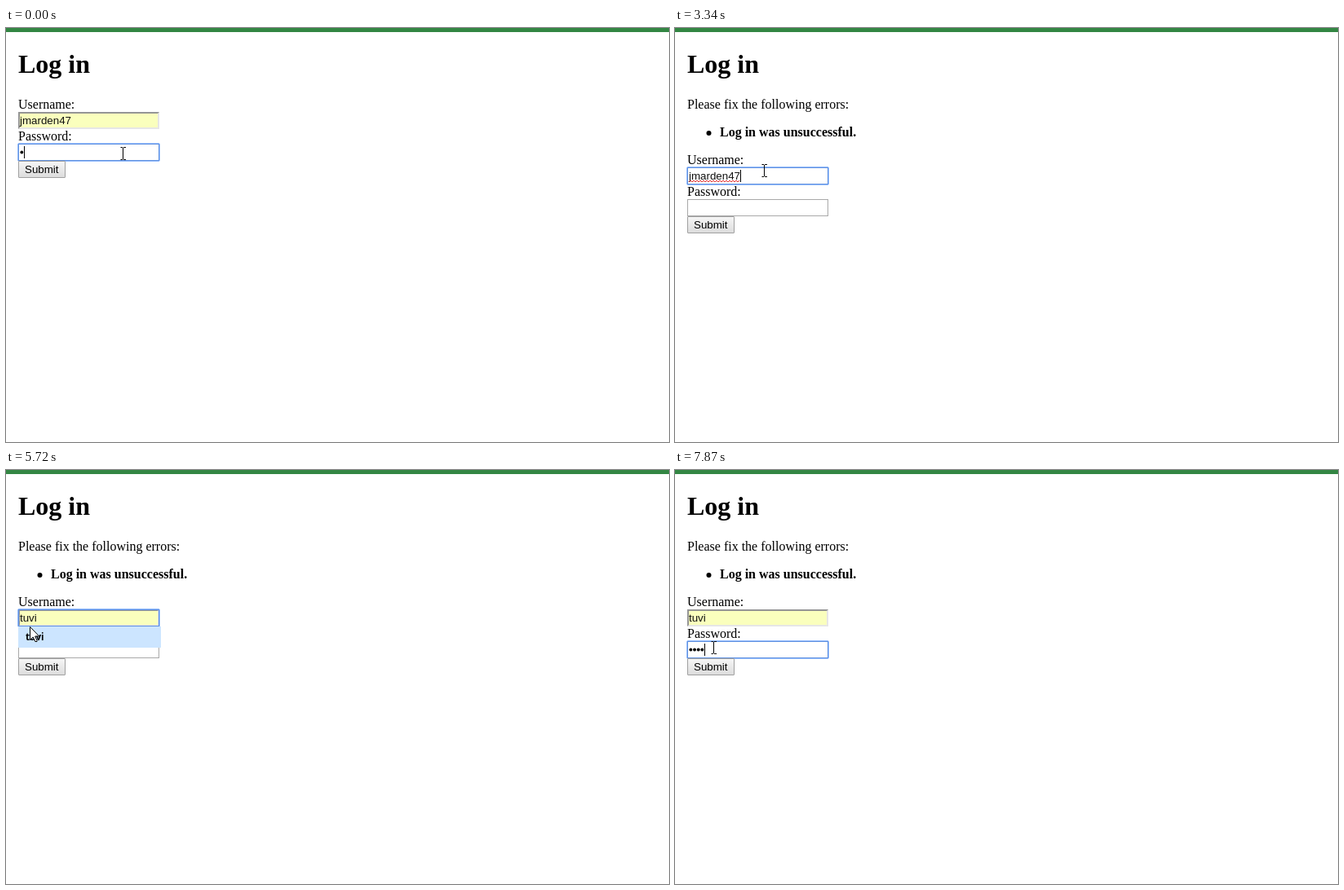
An HTML page for the animation above (8000 ms loop, 813x508 px).

```html
<!DOCTYPE html>
<html lang="en">
<head>
<meta charset="utf-8">
<title>Log in</title>
<style>
  html, body { margin: 0; width: 100%; height: 100%; overflow: hidden; background: #fff; }
  svg { display: block; }
  text { white-space: pre; }
  .serif { font: 16px "Liberation Serif", Times, serif; }
  .bold { font-weight: bold; }
  .title { font-size: 32px; }
  .sans { font: 13.333px "Liberation Sans", Arial, sans-serif; }
  .option { font: bold 11.5px "Open Sans", sans-serif; }
</style>
</head>
<body>
<svg id="stage" width="813" height="508" viewBox="0 0 813 508">
  <defs>
    <linearGradient id="up" x2="0" y2="1"><stop stop-color="#f6f6f6"/><stop offset="1" stop-color="#dcdcdc"/></linearGradient>
    <linearGradient id="down" x2="0" y2="1"><stop stop-color="#d8d8d8"/><stop offset="1" stop-color="#f0f0f0"/></linearGradient>
  </defs>
  <rect width="813" height="5" fill="#338643"/>
  <text class="serif bold title" x="15" y="55">Log in</text>
  <g id="view"></g>
</svg>
<script>
const LOOP = 8000;
const FIRST_USER = "jmarden47";
const NEXT_USER = "tuvi";
const TEXT_X = 17, DOT_STEP = 4.67;

const arrow = (x, y) => ({ kind: "arrow", x, y });
const beam = (x, y) => ({ kind: "beam", x, y });

// Each step changes only the listed parts of the state.
const steps = [
  [0, { error: false, user: FIRST_USER, ink: "#111", filled: true, focus: "pass", dots: 1, caret: true,
        button: "idle", menu: "", selectFrom: null, misspelt: false, pointer: beam(143, 154) }],
  [250, { dots: 2 }],
  [400, { dots: 3 }],
  [520, { dots: 4 }],
  [790, { pointer: arrow(44, 174) }],
  [950, { pointer: arrow(10, 188), caret: false }],
  [1090, { pointer: arrow(20, 180), button: "hover" }],
  [1220, { pointer: arrow(31, 169) }],
  [1360, { focus: "", button: "pressed" }],
  [1510, { button: "hover" }],
  [1910, { error: true, filled: false, dots: 0, button: "idle" }],
  [2570, { pointer: arrow(91, 168) }],
  [2710, { pointer: beam(109, 175) }],
  [3340, { focus: "user", caret: true, misspelt: true }],
  [3640, { pointer: beam(50, 178), selectFrom: 50, caret: false }],
  [3770, { pointer: beam(8, 181), selectFrom: TEXT_X }],
  [3920, { pointer: arrow(3, 173) }],
  [4760, { user: NEXT_USER.slice(0, 1), ink: "#8c1018", selectFrom: null, misspelt: false, caret: true, menu: "open" }],
  [4890, { user: NEXT_USER.slice(0, 2), ink: "#111" }],
  [5020, { user: NEXT_USER.slice(0, 3) }],
  [5160, { user: NEXT_USER }],
  [5570, { pointer: beam(22, 181) }],
  [5720, { pointer: arrow(29, 192), caret: false, menu: "active", filled: true }],
  [5840, { pointer: arrow(34, 193) }],
  [5960, { pointer: arrow(36, 194) }],
  [6090, { pointer: arrow(36, 196) }],
  [6210, { pointer: arrow(37, 198) }],
  [6350, { menu: "", caret: true }],
  [6470, { pointer: arrow(40, 202) }],
  [6620, { pointer: beam(47, 218) }],
  [6750, { focus: "pass" }],
  [7330, { caret: false }],
  [7480, { dots: 1, caret: true }],
  [7600, { dots: 2 }],
  [7750, { dots: 3 }],
  [7870, { dots: 4 }],
];

const pen = document.createElement("canvas").getContext("2d");
pen.font = '13.333px "Liberation Sans", Arial, sans-serif';
const widthOf = s => pen.measureText(s).width;

const rect = (x, y, w, h, fill, extra = "") =>
  `<rect x="${x}" y="${y}" width="${w}" height="${h}" fill="${fill}" ${extra}/>`;
const frame = (x, y, w, h, stroke, fill = "none", extra = "") =>
  rect(x + .5, y + .5, w - 1, h - 1, fill, `stroke="${stroke}" ${extra}`);
const label = (cls, x, y, s, extra = "") =>
  `<text class="${cls}" x="${x}" y="${y}" ${extra}>${s}</text>`;

function field(y, filled, focused) {
  let out;
  if (filled) {
    out = rect(15, y, 173, 21, "#e6e6e6") +
      `<path d="M15 ${y}h173l-2 2H17v17l-2 2z" fill="#959595"/>` +
      rect(17, y + 2, 169, 17, "#faffbd");
  } else {
    out = frame(15, y, 173, 21, "#a9a9a9", "#fff");
  }
  if (focused) {
    out += frame(14, y - 1, 175, 23, "#4d90fe", "none", 'rx="1.5" stroke-opacity=".6"') +
      frame(15, y, 173, 21, "#6292df");
  }
  return out;
}

function userText(s, y) {
  const end = TEXT_X + widthOf(s);
  let out = label("sans", TEXT_X, y + 15, s, `fill="${s.length ? "INK" : ""}"`);
  if (s === FIRST_USER) out = label("sans", TEXT_X, y + 15, s, 'fill="#111"');
  return { out, end };
}

function squiggle(from, to, y) {
  let d = `M${from} ${y}`;
  for (let x = from + 2, i = 1; x <= to; x += 2, i++) d += `L${x} ${y + (i % 2 ? -2 : 0)}`;
  return `<path d="${d}" fill="none" stroke="#e02020" stroke-width=".9"/>`;
}

function userField(s, y) {
  const end = TEXT_X + widthOf(s.user);
  let out = field(y, s.filled, s.focus === "user") +
    label("sans", TEXT_X, y + 15, s.user, `fill="${s.ink}"`);
  if (s.misspelt) out += squiggle(TEXT_X, end, y + 18);
  if (s.selectFrom !== null) {
    const box = [s.selectFrom, y + 3, end - s.selectFrom, 15];
    out += `<clipPath id="chosen">${rect(...box, "#000")}</clipPath>` + rect(...box, "#3399ff") +
      label("sans", TEXT_X, y + 15, s.user, 'fill="#fff" clip-path="url(#chosen)"');
  }
  return out;
}

function passField(s, y) {
  let out = field(y, false, s.focus === "pass");
  for (let i = 0; i < s.dots; i++)
    out += `<circle cx="${TEXT_X + DOT_STEP * (i + .5)}" cy="${y + 10.5}" r="1.9"/>`;
  return out;
}

function caret(s, top) {
  if (!s.caret || !s.focus) return "";
  const onUser = s.focus === "user";
  const x = Math.round(TEXT_X + (onUser ? widthOf(s.user) : DOT_STEP * s.dots));
  return rect(x, top + (onUser ? 3 : 42), 1, 15, "#000");
}

function button(mode, y) {
  const edge = mode === "idle" ? "#a0a0a0" : "#707070";
  const fill = mode === "pressed" ? "down" : "up";
  return frame(15, y, 58, 21, edge, `url(#${fill})`, 'rx=".5"') + label("sans", 23, y + 15, "Submit");
}

function menu(mode) {
  if (!mode) return "";
  const box = mode === "active"
    ? rect(15, 192, 175, 26, "#cce5ff")
    : frame(15, 192, 175, 26, "#d4d4d4", "#fff");
  return box + label("option", 24, 209, NEXT_USER);
}

function pointer({ kind, x, y }) {
  if (kind === "arrow")
    return `<path transform="translate(${x + .5} ${y + .5})" d="M0 0V16L3.7 12.5L6.3 18H8.5V17L6.2 11.5H11.2Z" fill="#fff" stroke="#000"/>`;
  return `<path transform="translate(${x + .5} ${y - 8})" d="M-3 .5H-.5M.5 .5H3.5M0 1V15M-3 15.5H-.5M.5 15.5H3.5" fill="none" stroke="#000"/>`;
}

function errors() {
  return label("serif", 15, 99, "Please fix the following errors:") +
    '<circle cx="41.5" cy="129" r="3"/>' +
    label("serif bold", 55, 133, "Log in was unsuccessful.");
}

function draw(s) {
  const top = s.error ? 171 : 103;
  return (s.error ? errors() : "") +
    label("serif", 15, top - 4, "Username:") +
    userField(s, top) +
    label("serif", 15, top + 35, "Password:") +
    passField(s, top + 39) +
    caret(s, top) +
    button(s.button, top + 60) +
    menu(s.menu) +
    pointer(s.pointer);
}

const view = document.getElementById("view");
const start = performance.now();
let shown = -1;

function tick() {
  const time = (performance.now() - start) % LOOP;
  const past = steps.filter(([at]) => at <= time);
  if (past.length !== shown) {
    shown = past.length;
    view.innerHTML = draw(Object.assign({}, ...past.map(step => step[1])));
  }
  requestAnimationFrame(tick);
}
tick();
</script>
</body>
</html>
```
